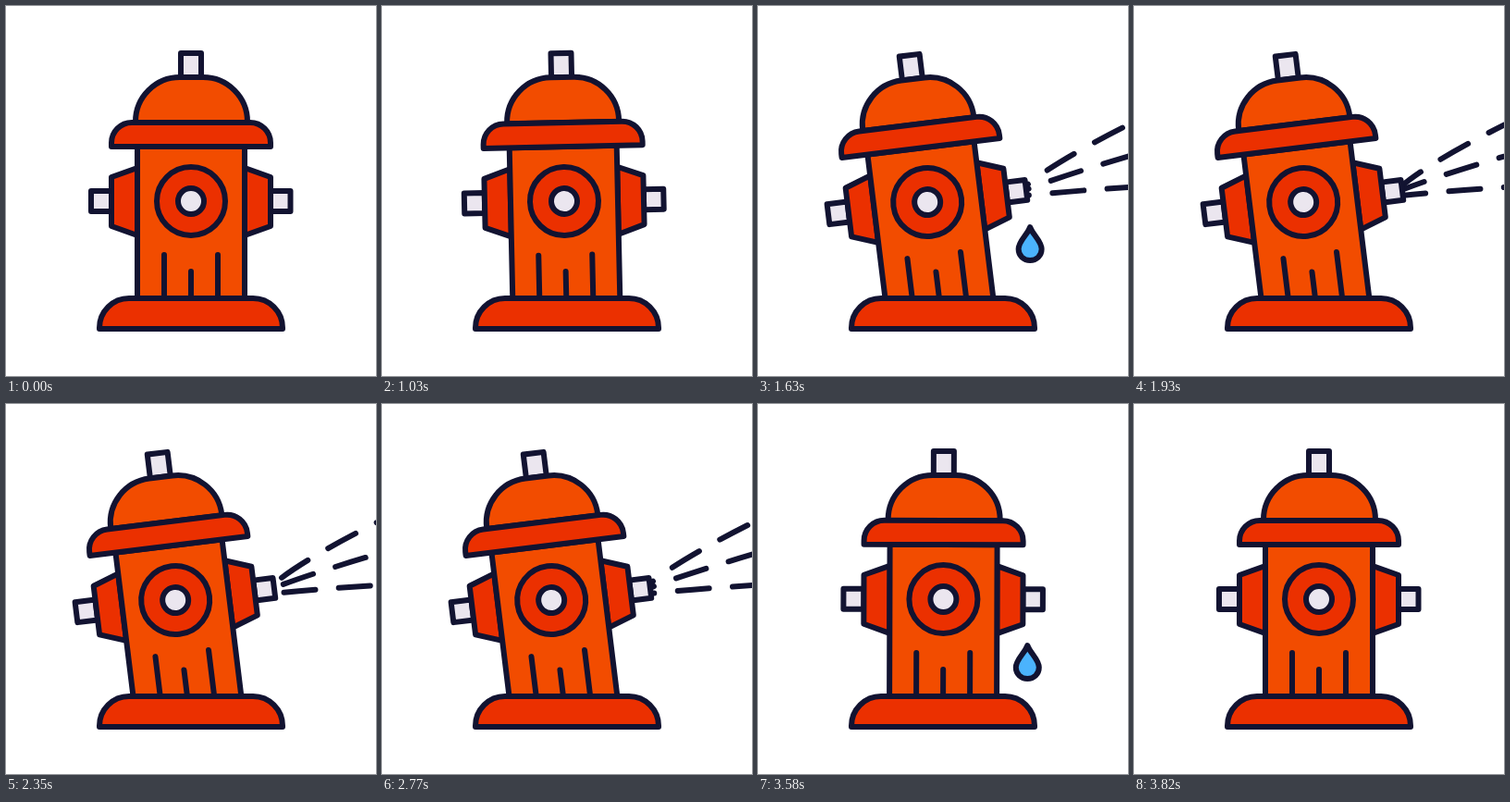
An HTML page with a canvas for the animation above (3850 ms loop, 400 by 400 pixels).

```html
<!DOCTYPE html>
<html>
<head>
<meta charset="utf-8">
<title>Fire hydrant</title>
<style>
html, body { margin: 0; height: 100%; overflow: hidden; background: #fff; }
canvas { display: block; }
</style>
</head>
<body>
<canvas id="stage" width="400" height="400"></canvas>
<script>
const ctx = document.getElementById('stage').getContext('2d');
const INK = '#121331', ORANGE = '#f24c00', RED = '#eb3000', PALE = '#ebe6ef', BLUE = '#4bb3fd';
const LOOP = 3850, PAUSE = 1000, STEP = 30;
const DASH = 34, PERIOD = 59.5;

const circle = (r) => `M${200 - r} 211a${r} ${r} 0 1 1 ${2 * r} 0a${r} ${r} 0 1 1 ${-2 * r} 0z`;
const shape = (fill, d) => ({ fill, path: new Path2D(d) });

const hydrant = [
  shape(PALE, 'M92 200H114V222H92zM286 200H307.5V222H286z'),
  shape(RED, 'M142 175L114 185V238L142 248zM258 175L286 185V238L258 248z'),
  shape(ORANGE, 'M142 152H258V335H142z'),
  shape(null, 'M171 269V325M200 287V325M229 269V325'),
  shape(PALE, 'M189 51H211V77H189z'),
  shape(ORANGE, 'M140 126v-1a48 48 0 0 1 48-48h25a48 48 0 0 1 48 48v1z'),
  shape(RED, 'M114 152v-4a22 22 0 0 1 22-22h128a22 22 0 0 1 22 22v4z'),
  shape(RED, circle(37)),
  shape(PALE, circle(14))
];
const base = shape(RED, 'M101 349v-1a32 32 0 0 1 32-32h134a32 32 0 0 1 32 32v1z');
const rays = [
  'M289 195Q325 164 440 109',
  'M289 199Q335 181 440 151',
  'M289 205Q340 199.5 440 193.5'
].map(d => new Path2D(d));

// [step, degrees]
const tiltKeys = [[0, 0], [4, -8], [9, -7], [80, -7], [88, 1.5], [94, 0]];

function tilt(n) {
  if (n <= 0) return 0;
  const i = tiltKeys.findIndex(k => k[0] >= n);
  if (i < 0) return 0;
  const [n0, a] = tiltKeys[i - 1], [n1, b] = tiltKeys[i];
  const p = (n - n0) / (n1 - n0);
  return a + (b - a) * p * p * (3 - 2 * p);
}

function paint({ fill, path }) {
  if (fill) {
    ctx.fillStyle = fill;
    ctx.fill(path);
  }
  ctx.stroke(path);
}

function drawWater(n) {
  const slow = Math.max(0, n - 59);
  const travel = 35.5 + 14.13 * (n - 13) - 0.11 * slow * slow;
  const head = 14.13 * (n - 3);
  const tail = Math.max(0, 58 + 11 * (n - 77));
  const phase = (travel % PERIOD + PERIOD) % PERIOD;
  for (let s = phase - PERIOD; s < 180; s += PERIOD) {
    const from = Math.max(s, tail), to = Math.min(s + DASH, head);
    if (to <= from) continue;
    ctx.setLineDash([to - from, 999]);
    ctx.lineDashOffset = -from;
    rays.forEach(r => ctx.stroke(r));
  }
  ctx.setLineDash([]);
}

// u: steps since the drop began to form
function drawDrop(x, u) {
  if (u <= 0 || u >= 25) return;
  const bottom = 230 + 0.178 * u * u;
  const full = Math.min(36, bottom - 213);
  const size = Math.min(1, u / 4, (25 - u) / 2);
  const h = full * size, w = 12.5 * size;
  const y = bottom - full + (u > 12 ? (full - h) / 2 : 0);
  const drop = new Path2D();
  drop.moveTo(x, y);
  drop.bezierCurveTo(x + w * .2, y + h * .22, x + w, y + h * .42, x + w, y + h * .66);
  drop.bezierCurveTo(x + w, y + h * .86, x + w * .55, y + h, x, y + h);
  drop.bezierCurveTo(x - w * .55, y + h, x - w, y + h * .86, x - w, y + h * .66);
  drop.bezierCurveTo(x - w, y + h * .42, x - w * .2, y + h * .22, x, y);
  drop.closePath();
  paint({ fill: BLUE, path: drop });
}

function draw(time) {
  const n = Math.floor((time % LOOP - PAUSE) / STEP);
  ctx.fillStyle = '#fff';
  ctx.fillRect(0, 0, 400, 400);
  ctx.strokeStyle = INK;
  ctx.lineWidth = 6;
  ctx.lineCap = ctx.lineJoin = 'round';

  if (n > 0) {
    drawWater(n);
    const u = n - 5.1;
    drawDrop(296.5 - 0.3 * Math.max(0, u - 8), u);
    drawDrop(291.3, n - 66.6);
  }

  ctx.save();
  ctx.translate(200, 349);
  ctx.rotate(tilt(n) * Math.PI / 180);
  ctx.translate(-200, -349);
  hydrant.forEach(paint);
  ctx.restore();
  paint(base);
}

const start = performance.now();
function tick() {
  draw(performance.now() - start);
  requestAnimationFrame(tick);
}
tick();
</script>
</body>
</html>
```
